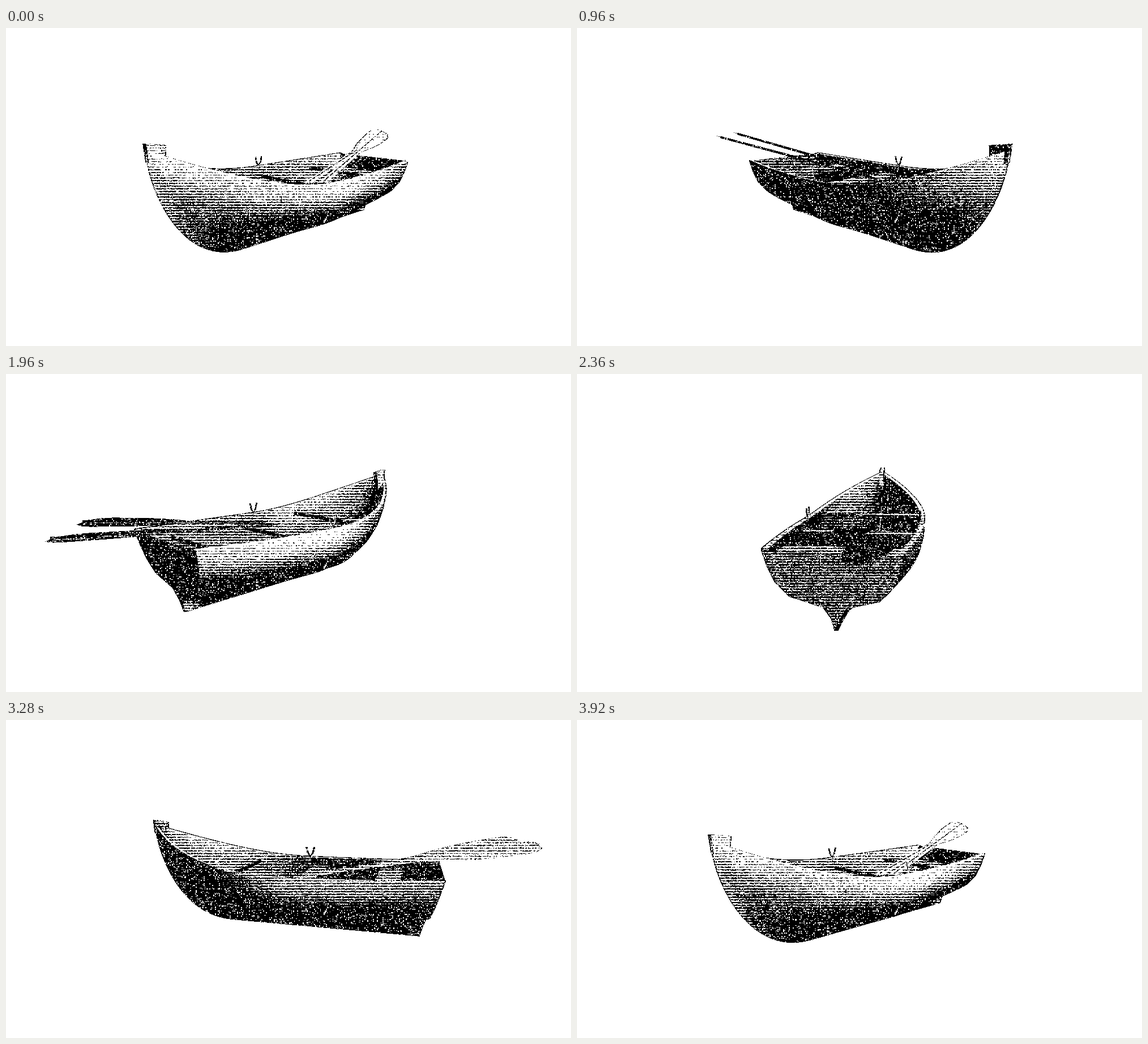
An HTML page with a canvas for the animation above (3960 ms loop, 998 by 561 pixels).

```html
<!DOCTYPE html>
<html lang="en">
<head>
<meta charset="utf-8">
<title>Rowing boat</title>
<style>
  html, body { margin: 0; width: 998px; height: 561px; overflow: hidden; background: #fff; }
  canvas { display: block; }
</style>
</head>
<body>
<canvas id="stage" width="998" height="561"></canvas>
<script>
const W = 998, H = 561;
const LOOP = 3960, STEP = 40;
const CAMERA = 770, CENTER_X = 506, HORIZON = 118.4;
const START = 46 * Math.PI / 180;
const LIGHT = [0.35, 0.75, 0.52];
const BOW = 278, STERN = -250, KEEL = 242;

const ctx = document.getElementById('stage').getContext('2d');
const image = ctx.createImageData(W, H);
const pixels = new Uint32Array(image.data.buffer);
const depth = new Float32Array(W * H);
const shade = new Float32Array(W * H);

const clamp = (x, lo = 0, hi = 1) => Math.min(hi, Math.max(lo, x));
const mix = (a, b, t) => a + (b - a) * t;

// Model space: s runs along the boat towards the bow, l across, d downwards.
const sheer = a => a > 0 ? 139 - 66 * (a / BOW) ** 2 : 139 - 5 * (a / STERN) ** 2;
const beam = a => a > 0 ? 107 * (1 - (a / BOW) ** 2.58) : 107 - 20 * (a / STERN) ** 2;
const keel = a => {
  const t = clamp((a - 110) / (BOW - 110));
  return 73 + (KEEL - 73) * (1 - t ** 2.3) ** 0.67;
};

// Cross sections as [share of beam, share of depth].
const SECTIONS = {
  stern: [[1, 0], [.95, .2], [.86, .4], [.67, .58], [.17, .7], [.06, .85], [.03, 1]],
  mid: [[1, 0], [.99, .2], [.94, .4], [.82, .58], [.6, .75], [.25, .9], [.02, 1]],
  bow: [[1, 0], [.92, .18], [.8, .36], [.61, .54], [.4, .7], [.18, .86], [.02, 1]]
};

function hullPoint(a, row, across) {
  const end = a > 0 ? SECTIONS.bow : SECTIONS.stern;
  const t = a > 0 ? clamp(a / 200) : (a / STERN) ** 2;
  const wide = mix(SECTIONS.mid[row][0], end[row][0], t);
  const deep = mix(SECTIONS.mid[row][1], end[row][1], t);
  const rake = 35 * deep * Math.max(0, a / STERN);
  return [a + rake, across * wide * beam(a), mix(sheer(a), keel(a), deep)];
}

const surfaces = [];

// Grid surface from point(i, j); `out` orients normals, `inside` darkens the back face.
function surface(nu, nv, point, { out = null, inside = () => 0, bias = 0 } = {}) {
  const at = (i, j) => point(clamp(i, 0, nu), clamp(j, 0, nv));
  const verts = [];
  for (let j = 0; j <= nv; j++) for (let i = 0; i <= nu; i++) {
    const [e, f] = [[at(i + 1, j), at(i - 1, j)], [at(i, j + 1), at(i, j - 1)]]
      .map(([p, q]) => p.map((c, n) => c - q[n]));
    let n = [e[1] * f[2] - e[2] * f[1], e[2] * f[0] - e[0] * f[2], e[0] * f[1] - e[1] * f[0]];
    const len = Math.hypot(...n) || 1;
    const flip = out && n[0] * out[0] + n[1] * out[1] + n[2] * out[2] < 0 ? -1 : 1;
    n = n.map(c => c * flip / len);
    verts.push({ p: at(i, j), n, back: inside(j / nv), bias });
  }
  surfaces.push({ nu, nv, verts });
}

const quad = (a, b, c, d, opts) => surface(1, 1, (i, j) => j ? (i ? c : d) : (i ? b : a), opts);

function buildHull() {
  const N = 44;
  const along = i => BOW - (BOW - STERN) * (1 - i / N) ** 1.7;
  for (const side of [1, -1]) {
    const out = [0, side, 0];
    surface(N, 6, (i, j) => hullPoint(along(i), j, side), { out, inside: v => -.22 - .45 * v });
    surface(N, 1, (i, j) => [along(i), side * beam(along(i)), sheer(along(i)) - 2.5 + 2.5 * j],
      { out, inside: () => -1 });
    surface(N, 1, (i, j) => [along(i), side * Math.max(0, beam(along(i)) - 8 * j), sheer(along(i)) - 1],
      { bias: .15 });
  }
  surface(6, 6, (i, j) => hullPoint(STERN, j, i / 3 - 1), { out: [-1, 0, 0], inside: () => -.4 });
}

function buildFittings() {
  for (const [s, half] of [[-165, 20], [-30, 15], [105, 13]]) {
    const w = beam(s) - 6, d = sheer(s) + 15;
    quad([s - half, -w, d], [s + half, -w, d], [s + half, w, d], [s - half, w, d], { bias: .05 });
    for (const e of [s - half, s + half])
      quad([e, -w, d], [e, w, d], [e, w, d + 7], [e, -w, d + 7], { bias: -.3 });
  }
  // Stem post
  const top = BOW + 1;
  for (const l of [-5, 5])
    quad([250, l, 67], [top, l, 63], [top - 4, l, 88], [252, l, 105], { bias: -.1 });
  quad([250, -5, 67], [top, -5, 63], [top, 5, 63], [250, 5, 67], { bias: .1 });
  quad([250, -5, 67], [250, 5, 67], [252, 5, 105], [252, -5, 105]);
  quad([top, -5, 63], [top, 5, 63], [top - 4, 5, 88], [top - 4, -5, 88], { bias: -.3 });
  // Oarlocks
  const bar = (l, s0, d0, s1, d1) => {
    quad([s0 - 2, l, d0], [s0 + 2, l, d0], [s1 + 2, l, d1], [s1 - 2, l, d1], { bias: -.1 });
    quad([s0, l - 1.5, d0], [s0, l + 1.5, d0], [s1, l + 1.5, d1], [s1, l - 1.5, d1], { bias: -.1 });
  };
  for (const l of [-100, 100]) {
    bar(l, -8, 144, -8, 134);
    bar(l, -8, 135, -13, 130);
    bar(l, -8, 135, -3, 130);
    bar(l, -13, 130, -16, 118);
    bar(l, -3, 130, 0, 118);
  }
}

function buildOar(handle, tip) {
  const N = 30;
  const center = t => handle.map((c, n) => mix(c, tip[n], t));
  const half = t => (5 + 16 * Math.sin(clamp((t - .52) / .3) * Math.PI / 2))
    * Math.sqrt(1 - clamp((t - .93) / .08) ** 2);
  surface(N, 2, (i, j) => {
    const [s, l, d] = center(i / N), w = half(i / N) * (j - 1);
    return [s - w * .25, l + w, d + w * .35];
  }, { bias: -.02 });
  surface(N, 1, (i, j) => {
    const [s, l, d] = center(i / N);
    return [s, l, d - 2.5 + 5 * j];
  }, { bias: -.2 });
}

buildHull();
buildFittings();
buildOar([-10, 30, 150], [-408, -75, 97]);
buildOar([-20, 54, 148], [-370, -52, 88]);

// Print screen: random specks in the darks, broken horizontal lines in the lights.
const screen = new Float32Array(W * H);
function hash(x, y) {
  let h = Math.imul(x, 374761393) ^ Math.imul(y, 668265263);
  h = Math.imul(h ^ (h >>> 13), 1274126177);
  return ((h ^ (h >>> 16)) >>> 0) / 4294967296;
}
for (let y = 0; y < H; y++) for (let x = 0; x < W; x++) {
  const line = .5 + .5 * Math.cos(2 * Math.PI * y / 4.8);
  const grain = hash((x / 1.7 | 0) + 7, (y / 1.5 | 0) + 3);
  screen[y * W + x] = grain < .12 ? grain : .2 + .42 * line + .34 * grain;
}

function project({ p: [s, l, d], n, back, bias }, cos, sin) {
  const x = -cos * s + sin * l, z = sin * s + cos * l;
  const nx = -cos * n[0] + sin * n[1], nz = sin * n[0] + cos * n[1];
  const k = CAMERA / (CAMERA - z);
  return {
    x: CENTER_X + k * x, y: HORIZON + k * d, k, back, bias,
    facing: nz * (CAMERA - z) - nx * x - n[2] * d,
    lit: nx * LIGHT[0] + nz * LIGHT[1] - n[2] * LIGHT[2]
  };
}

function triangle(a, b, c, la, lb, lc) {
  const area = (b.x - a.x) * (c.y - a.y) - (c.x - a.x) * (b.y - a.y);
  if (Math.abs(area) < 1e-6) return;
  const x0 = Math.max(0, Math.floor(Math.min(a.x, b.x, c.x)));
  const x1 = Math.min(W - 1, Math.ceil(Math.max(a.x, b.x, c.x)));
  const y0 = Math.max(0, Math.floor(Math.min(a.y, b.y, c.y)));
  const y1 = Math.min(H - 1, Math.ceil(Math.max(a.y, b.y, c.y)));
  for (let y = y0; y <= y1; y++) for (let x = x0; x <= x1; x++) {
    const v = ((x - a.x) * (c.y - a.y) - (c.x - a.x) * (y - a.y)) / area;
    const w = ((b.x - a.x) * (y - a.y) - (x - a.x) * (b.y - a.y)) / area;
    const u = 1 - v - w;
    if (u < 0 || v < 0 || w < 0) continue;
    const k = u * a.k + v * b.k + w * c.k, i = y * W + x;
    if (k <= depth[i]) continue;
    depth[i] = k;
    shade[i] = u * la + v * lb + w * lc;
  }
}

function drawSurface({ nu, nv, verts }, cos, sin) {
  const pts = verts.map(v => project(v, cos, sin));
  for (let j = 0; j < nv; j++) for (let i = 0; i < nu; i++) {
    const o = j * (nu + 1) + i;
    const q = [pts[o], pts[o + 1], pts[o + nu + 2], pts[o + nu + 1]];
    const front = q.reduce((sum, v) => sum + v.facing, 0) >= 0;
    const l = q.map(v => (front ? v.lit : v.back - v.lit) + v.bias);
    triangle(q[0], q[1], q[2], l[0], l[1], l[2]);
    triangle(q[0], q[2], q[3], l[0], l[2], l[3]);
  }
}

function draw(frame) {
  const angle = START + 2 * Math.PI * frame * STEP / LOOP;
  const cos = Math.cos(angle), sin = Math.sin(angle);
  depth.fill(0);
  for (const part of surfaces) drawSurface(part, cos, sin);
  for (let i = 0; i < pixels.length; i++) {
    let black = false;
    if (depth[i]) {
      let tone = .16 + 1.65 * Math.max(0, shade[i] - .3);
      if (!depth[i - 2] || !depth[i + 2]) tone *= .5;
      black = tone < screen[i];
    }
    pixels[i] = black ? 0xff000000 : 0xffffffff;
  }
  ctx.putImageData(image, 0, 0);
}

let shown = -1;
const begin = performance.now();
function tick() {
  const frame = Math.floor((performance.now() - begin) % LOOP / STEP);
  if (frame !== shown) draw(shown = frame);
  requestAnimationFrame(tick);
}
draw(shown = 0);
requestAnimationFrame(tick);
</script>
</body>
</html>
```
